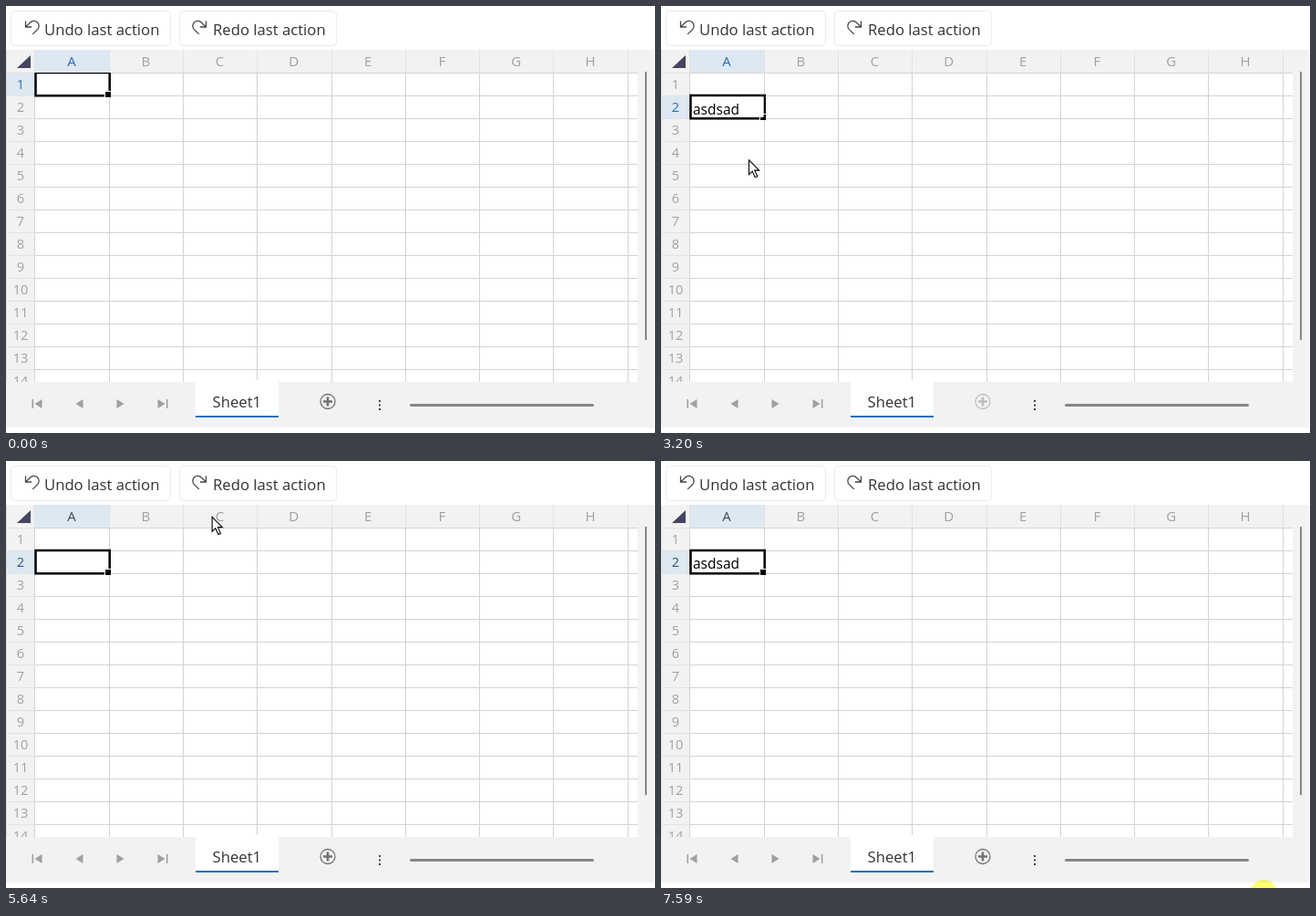
Animation of 712x468 px, one loop 7.72 s. Source, as an HTML page with a canvas:

```html
<!DOCTYPE html>
<html lang="en">
<head>
<meta charset="utf-8">
<title>Spreadsheet undo and redo</title>
<style>
  html, body { margin: 0; width: 100%; height: 100%; overflow: hidden; background: #fff; }
  canvas { display: block; }
</style>
</head>
<body>
<canvas id="stage" width="712" height="468"></canvas>
<script>
const ctx = document.getElementById('stage').getContext('2d');
const LOOP = 7720, STEP = 70;
const FONT = '"Open Sans", "Noto Sans", sans-serif';
const PANEL = '#f2f2f2', LINE = '#d3d3d3', SOFT_LINE = '#e2e2e2';
const ACTIVE = '#dde8f2', BLUE = '#2b6cb0', MUTED = '#a2a09e', INK = '#333';

// Story, in ms.
const SELECT = 740, EDIT = 1610, CARET_OFF = 3000, COMMIT = 3400, UNDO = 4760, REDO = 6120, LEAVE = 7660;
const TYPED = 'asdsad';
const KEYS = [1680, 2010, 2010, 2340, 2470, 2470];

const START = { x: 674, y: 421 };
const MOVES = [
  { start: 120, time: 550, x: 62, y: 104, bend: 0 },
  { start: 1090, time: 130, x: 90, y: 174, bend: 0 },
  { start: 3200, time: 1, x: 96, y: 168, bend: 0 },
  { start: 3740, time: 550, x: 114, y: 34, bend: 0 },
  { start: 5300, time: 480, x: 275, y: 26, bend: -.46 },
  { start: 6720, time: 740, x: 661, y: 474, bend: .4 },
];

const between = (t, from, to) => t >= from && t < to;

// Eased quadratic path from stop to stop; bend pushes its control point sideways.
function cursorAt(t) {
  const i = MOVES.findLastIndex(m => t >= m.start);
  if (i < 0) return null;
  const from = MOVES[i - 1] || START, to = MOVES[i];
  const steps = Math.max(1, Math.round(to.time / STEP));
  const p = Math.min(1, (Math.floor((t - to.start) / to.time * steps) + 1) / (steps + 1));
  const s = p * p * (3 - 2 * p), r = 1 - s;
  const dx = to.x - from.x, dy = to.y - from.y;
  const bezier = (a, c, b) => r * r * a + 2 * r * s * c + s * s * b;
  return {
    x: bezier(from.x, from.x + dx / 2 + dy * to.bend, to.x),
    y: bezier(from.y, from.y + dy / 2 - dx * to.bend, to.y),
  };
}

function rect(x, y, w, h, color) {
  ctx.fillStyle = color;
  ctx.fillRect(x, y, w, h);
}

function text(str, x, y, size, color, align = 'left') {
  ctx.font = `${size}px ${FONT}`;
  ctx.textAlign = align;
  ctx.fillStyle = color;
  ctx.fillText(str, x, y);
}

function shape(path, { fill, stroke, width = 1.3, x = 0, y = 0, flip = 1 }) {
  ctx.save();
  ctx.translate(x, y);
  ctx.scale(flip, 1);
  const p = new Path2D(path);
  if (fill) { ctx.fillStyle = fill; ctx.fill(p); }
  if (stroke) { ctx.strokeStyle = stroke; ctx.lineWidth = width; ctx.stroke(p); }
  ctx.restore();
}

function clipped(x, y, w, h, draw) {
  ctx.save();
  ctx.beginPath();
  ctx.rect(x, y, w, h);
  ctx.clip();
  draw();
  ctx.restore();
}

function button(x, w, label, iconX, flip, cursor) {
  const hover = cursor && between(cursor.x, x, x + w) && between(cursor.y, 5, 44);
  ctx.beginPath();
  ctx.roundRect(x + .5, 5.5, w - 1, 38, 4);
  ctx.fillStyle = hover ? '#f9f9f9' : '#fff';
  ctx.fill();
  ctx.strokeStyle = '#ebebeb';
  ctx.lineWidth = 1;
  ctx.stroke();
  shape('M0 0v6.5h6.5M.4 6.1l4.6-4.4a5.5 5.5 0 0 1 8.2 7.4l-5.5 5.3', { stroke: '#444', x: iconX, y: 16.5, flip });
  text(label, x + 37, 32, 16.7, INK);
}

const colX = i => Math.round(31.4 + 81.28 * i);
const rowY = n => 48 + 25 * n;

function drawGrid(row, blurred) {
  rect(0, 48, 711, 414, PANEL);
  rect(32, 73, 661, 339, '#fff');
  rect(32, 48, 81, 25, ACTIVE);
  rect(1, rowY(row), 31, 25, ACTIVE);
  rect(0, 48, 1, 364, SOFT_LINE);
  shape('M27 54v14H12z', { fill: '#45455f' });

  for (let i = 0; i <= 8; i++) {
    rect(colX(i), 48, 1, 25, SOFT_LINE);
    rect(colX(i), 73, 1, 339, LINE);
    const color = i ? MUTED : blurred ? '#404a55' : BLUE;
    if (i < 8) text('ABCDEFGH'[i], 72 + 81.28 * i, 66, 15, color, 'center');
  }
  clipped(0, 48, 693, 364, () => {
    for (let n = 1; n <= 14; n++) {
      rect(1, rowY(n), 31, 1, SOFT_LINE);
      rect(32, rowY(n), 661, 1, LINE);
      const color = n !== row ? MUTED : blurred ? '#33557c' : BLUE;
      text(n, 16, rowY(n) + 18, 14.5, color, 'center');
    }
  });
  rect(701, 72, 2, 294, '#868686');
}

function drawSelection(row, value, editing, caret) {
  const y = rowY(row);
  clipped(31, 73, 90, 339, () => {
    ctx.strokeStyle = '#000';
    ctx.lineWidth = 2.5;
    ctx.strokeRect(32.5, y, 81.2, 25.3);
    rect(108, y + 20, 7, 7, '#fff');
    rect(109, y + 21, 6, 6, '#000');
    if (editing) rect(34, y + 2, 78.5, 22, '#fff');
  });
  text(value, 35, editing ? 119 : 118, 15.5, '#000');
  if (caret) rect(Math.round(35 + ctx.measureText(value).width), 102, 1, 19, '#000');
}

function drawFooter(editing) {
  rect(0, 412, 711, 50, PANEL);
  for (let i = 0; i < 4; i++) {
    const arrow = { fill: '#a0a0a0', x: 35.5 + 45 * i, y: 436, flip: i < 2 ? 1 : -1 };
    shape('M4 -5v10l-8-5z', arrow);
    if (i % 3 === 0) shape('M-7 -5h1.6v10h-1.6z', arrow);
  }
  rect(208, 410, 91, 41, '#fff');
  rect(208, 449, 91, 2, '#1f70c1');
  text('Sheet1', 226.5, 440, 16.7, INK);
  const plus = editing ? '#bebebe' : '#727272';
  shape('M361 433.5a8 8 0 1 1-16 0a8 8 0 1 1 16 0', { stroke: plus });
  shape('M353 428.5v10M348 433.5h10', { stroke: plus, width: 2.6 });
  for (let i = 0; i < 3; i++) rect(409, 432 + 4.5 * i, 2, 2, '#444');
  ctx.lineCap = 'round';
  shape('M444.5 437.5H643.5', { stroke: '#868686', width: 3 });
  ctx.lineCap = 'butt';
}

function drawCursor({ x, y }, pressed) {
  if (pressed) {
    ctx.globalCompositeOperation = 'multiply';
    shape('M15 0a15 15 0 1 1-30 0a15 15 0 1 1 30 0', { fill: '#ffff70', x, y });
    ctx.globalCompositeOperation = 'source-over';
  }
  shape('M.5 .8v15.8l3.7-3.5 3 6.8 2.6-1.1-3-6.7h4.9z', { fill: '#fff', stroke: '#000', width: 1.1, x, y });
}

function render() {
  const t = performance.now() % LOOP;
  const cursor = cursorAt(t);
  const editing = between(t, EDIT, COMMIT);
  const row = t < SELECT ? 1 : between(t, COMMIT, UNDO) ? 3 : 2;
  const typed = TYPED.slice(0, KEYS.filter(key => t >= key).length);
  const value = between(t, UNDO, REDO) ? '' : typed;
  const pressed = [SELECT, UNDO, REDO, LEAVE].some(click => between(t, click - STEP, click + STEP));

  rect(0, 0, 712, 468, '#fff');
  button(5, 176, 'Undo last action', 21.5, 1, cursor);
  button(190, 173, 'Redo last action', 219.5, -1, cursor);
  drawGrid(row, t >= UNDO - STEP);
  drawSelection(row, value, editing, editing && t < CARET_OFF);
  drawFooter(editing);
  if (cursor) drawCursor(cursor, pressed);
  requestAnimationFrame(render);
}
render();
</script>
</body>
</html>
```
